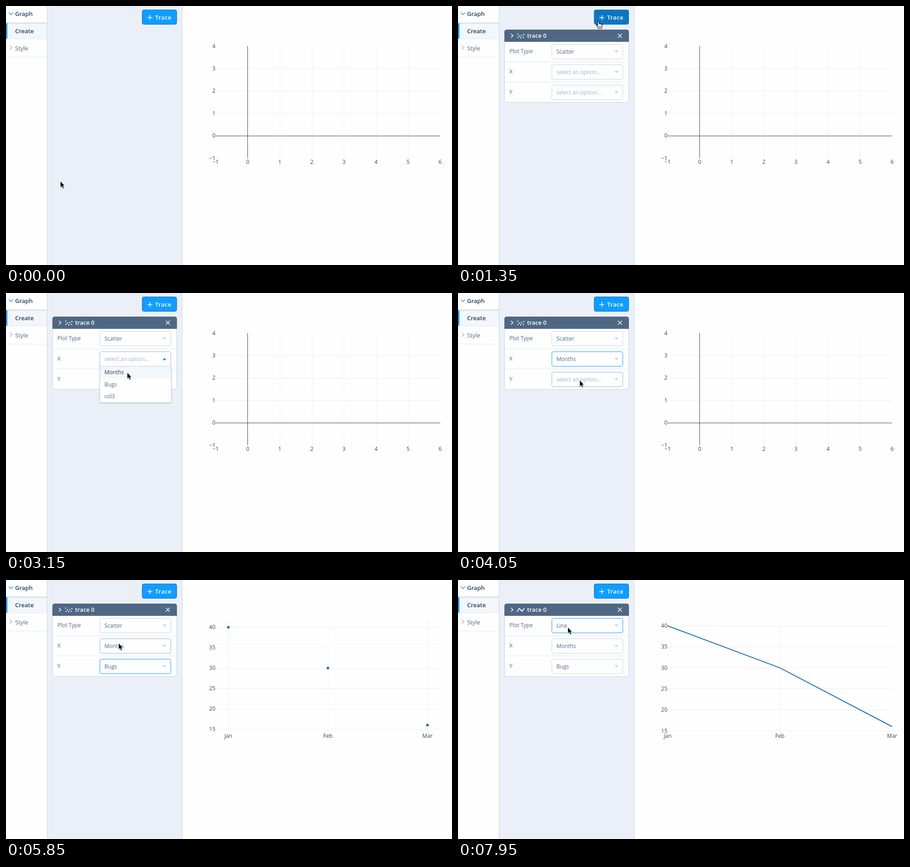
Recreate the animation shown at these times as an HTML page with a canvas. Size 981 by 571 pixels, loop 8 s.

```html
<!DOCTYPE html>
<html lang="en">
<head>
<meta charset="utf-8">
<title>Graph editor</title>
<style>
  html, body { margin: 0; width: 100%; height: 100%; overflow: hidden; background: #fefefe; }
  canvas { display: block; }
</style>
</head>
<body>
<canvas id="stage" width="981" height="571"></canvas>
<script>
const ctx = document.getElementById('stage').getContext('2d');
const LOOP = 8000, TICK = 150;
const BLUE = '#119dff', NAVY = '#0d76bf', SLATE = '#506784', INK = '#2a3f5f';
const MIST = '#c8d4e3', HAZE = '#a2b1c6', PALE = '#f3f6fa', RULE = '#dfe8f3';
const PLOT = { left: 461, right: 955, top: 88, bottom: 335 };

// Pointer moves: first tick, number of ticks, destination
const START = [120, 387];
const MOVES = [
  [300, 6, 309, 34], [1650, 6, 272, 140], [2850, 3, 267, 176], [3900, 2, 268, 193],
  [4650, 4, 262, 250], [5700, 3, 243, 102], [6450, 3, 250, 157], [7650, 3, 242, 105]
];

const SELECTS = [
  { key: 'type', label: 'Plot Type', y: 84, options: ['Scatter', 'Line', 'Area', 'Bar', 'Pie'] },
  { key: 'x', label: 'X', y: 129, options: ['Months', 'Bugs', 'col3'] },
  { key: 'y', label: 'Y', y: 174, options: ['Months', 'Bugs', 'col3'] }
];
const ROW = 26.5;

const within = (t, a, b) => t >= a && t < b;

function pointerAt(t) {
  let [x, y] = START;
  for (const [t0, steps, tx, ty] of MOVES) {
    if (t < t0) break;
    const u = Math.min(1, (Math.floor((t - t0) / TICK) + 1) / steps);
    const e = u * u * (3 - 2 * u);
    x += (tx - x) * e;
    y += (ty - y) * e;
  }
  return { x: Math.round(x), y: Math.round(y) };
}

function stateAt(t) {
  return {
    pointer: pointerAt(t),
    panel: t >= 1350,
    open: within(t, 2550, 3450) ? 'x' : within(t, 4350, 5250) ? 'y' : within(t, 6150, 7200) ? 'type' : '',
    focus: within(t, 3450, 4350) ? 'x' : within(t, 5250, 6150) ? 'y' : t >= 7200 ? 'type' : '',
    values: { type: t >= 7200 ? 'Line' : 'Scatter', x: t >= 3450 ? 'Months' : '', y: t >= 5250 ? 'Bugs' : '' },
    chart: t < 5250 ? 'empty' : t < 7200 ? 'scatter' : 'line'
  };
}

function rect(x, y, w, h, color) {
  ctx.fillStyle = color;
  ctx.fillRect(x, y, w, h);
}

function box(x, y, w, h, radius, fill, border) {
  ctx.beginPath();
  ctx.roundRect(x + .5, y + .5, w - 1, h - 1, radius);
  ctx.fillStyle = fill;
  ctx.fill();
  ctx.strokeStyle = border;
  ctx.lineWidth = 1;
  ctx.stroke();
}

function text(str, x, y, color, size = 12, weight = 400, align = 'left') {
  ctx.font = `${weight} ${size}px "Open Sans", sans-serif`;
  ctx.textAlign = align;
  ctx.fillStyle = color;
  ctx.fillText(str, x, y);
}

function trace(points) {
  ctx.beginPath();
  points.forEach(([x, y], i) => i ? ctx.lineTo(x, y) : ctx.moveTo(x, y));
}

function polyline(points, color, width) {
  trace(points);
  ctx.strokeStyle = color;
  ctx.lineWidth = width;
  ctx.stroke();
}

function polygon(points, color) {
  trace(points);
  ctx.fillStyle = color;
  ctx.fill();
}

function dot(x, y, r, color) {
  ctx.beginPath();
  ctx.arc(x, y, r, 0, 7);
  ctx.fillStyle = color;
  ctx.fill();
}

function drawSidebar() {
  rect(0, 0, 90, 571, '#fefefe');
  rect(0, 38, 90, 34, PALE);
  rect(0, 36, 90, 1, '#e6ecf4');
  rect(0, 37, 90, 1, '#d3dcea');
  rect(0, 38, 90, 1, '#e2e8f1');
  rect(0, 39, 90, 1, '#ecf0f6');
  rect(0, 38, 3, 34, BLUE);
  rect(0, 72, 90, 1, RULE);
  rect(0, 112, 90, 1, RULE);
  polyline([[6.5, 14.5], [11, 19], [15.5, 14.5]], BLUE, 1.5);
  polyline([[8.5, 87.5], [13, 92], [8.5, 96.5]], HAZE, 1.3);
  text('Graph', 20, 22, INK, 13, 600);
  text('Create', 20, 60, INK, 13, 600);
  text('Style', 20, 98, SLATE, 13);
}

function drawButton(hot) {
  box(299, 8, 77, 33, 4, hot ? NAVY : BLUE, NAVY);
  polyline([[311, 25.5], [322, 25.5]], '#fff', 1.5);
  polyline([[316.5, 20], [316.5, 31]], '#fff', 1.5);
  ctx.letterSpacing = '0.5px';
  text('Trace', 328, 30, '#fff', 13, 600);
  ctx.letterSpacing = '0px';
}

function drawTypeIcon(type) {
  if (type === 'Line') {
    polyline([[130, 70], [135, 62.5], [141, 69], [146, 62]], '#fff', 2);
    return;
  }
  const dots = [[131.5, 62], [132, 69], [135.5, 66], [138, 70], [140, 65], [143.5, 69], [145, 63]];
  for (const [x, y] of dots) dot(x, y, 1.3, '#fff');
}

function drawSelect(sel, s) {
  const open = s.open === sel.key;
  const p = s.pointer;
  const hover = !s.open && within(p.x, 206, 363) && within(p.y, sel.y, sel.y + 33);
  const border = s.focus === sel.key ? BLUE : open || hover ? HAZE : MIST;
  const value = s.values[sel.key];
  box(206, sel.y, 157, 33, open ? [3, 3, 0, 0] : 3, '#fefefe', border);
  text(value || 'select an option...', 216.5, sel.y + 21, value ? SLATE : HAZE);
  const y = sel.y + 14;
  if (open) polygon([[344, y + 5], [348.5, y], [353, y + 5]], BLUE);
  else polygon([[344, y], [353, y], [348.5, y + 5]], MIST);
}

function drawMenu(sel, s) {
  const top = sel.y + 33;
  const height = sel.options.length * ROW;
  const picked = sel.options.indexOf(s.values[sel.key]);
  const over = Math.floor((s.pointer.y - top) / ROW);
  const active = Math.max(0, over);
  ctx.save();
  ctx.shadowColor = 'rgba(42,63,95,.25)';
  ctx.shadowBlur = 3;
  ctx.shadowOffsetY = 1;
  rect(206, top, 158, height + .5, MIST);
  ctx.restore();
  rect(207, top, 156, height - .5, '#fefefe');
  rect(206, top - 1, 157, 1, MIST);
  sel.options.forEach((name, i) => {
    const y = top + i * ROW;
    if (i === active || i === picked) rect(207, y, 156, ROW, PALE);
    text(name, 216.5, Math.round(y + 17), i === active || i === picked ? INK : SLATE, 12, i === picked ? 600 : 400);
  });
}

function drawPanel(s) {
  box(102, 52, 274, 161, 5, '#fefefe', MIST);
  ctx.beginPath();
  ctx.roundRect(102, 52, 274, 27, [5, 5, 0, 0]);
  ctx.fillStyle = SLATE;
  ctx.fill();
  polyline([[116.5, 61.5], [121, 65.5], [116.5, 69.5]], '#fff', 1.5);
  drawTypeIcon(s.values.type);
  text('trace 0', 152, 70, '#fff', 13, 600);
  polyline([[351.5, 61], [360.5, 70]], '#fff', 1.2);
  polyline([[360.5, 61], [351.5, 70]], '#fff', 1.2);
  rect(103, 123, 272, 1, RULE);
  rect(103, 167, 272, 1, RULE);
  for (const sel of SELECTS) {
    text(sel.label, 113, sel.y + 20, SLATE);
    drawSelect(sel, s);
  }
  const opened = SELECTS.find(sel => sel.key === s.open);
  if (opened) drawMenu(opened, s);
}

const column = (x, color) => rect(Math.round(x), PLOT.top, 1, PLOT.bottom - PLOT.top + .5, color);
const line = (y, color) => rect(PLOT.left, Math.round(y) - .0, PLOT.right - PLOT.left, 1, color);
const tickX = (label, x) => text(label, x, 348, '#444', 12, 400, 'center');
const tickY = (label, y) => text(label, 460.5, Math.round(y + 4), '#444', 12, 400, 'right');
const signed = n => String(n).replace('-', '\u2212');

function drawEmptyChart() {
  const px = n => PLOT.left + (n + 1) * 494 / 7;
  const py = n => 285.9 - n * 49.4;
  for (let n = 1; n < 6; n++) column(px(n), '#eee');
  for (let n = 1; n < 4; n++) line(py(n) - .4, '#eee');
  column(px(0) - .1, '#444');
  line(py(0) - .4, '#444');
  for (let n = -1; n <= 6; n++) tickX(signed(n), px(n));
  for (let n = -1; n <= 4; n++) tickY(signed(n), py(n) + .3);
}

function drawDataChart(lines) {
  const gap = lines ? 247 : 219;
  const px = i => 708 + (i - 1) * gap;
  const py = lines ? v => 101 + (40 - v) * 9.26 : v => 104.3 + (40 - v) * 8.99;
  for (let i = 0; i < 3; i++) if (!lines || i === 1) column(px(i) - .5, '#eee');
  for (let v = 15; v <= 40; v += 5) {
    line(py(v) - .5, '#eee');
    tickY(v, py(v));
  }
  ['Jan', 'Feb', 'Mar'].forEach((m, i) => tickX(m, px(i)));
  const points = [40, 30, 16].map((v, i) => [px(i), py(v)]);
  if (lines) polyline(points, '#1f77b4', 2);
  else for (const [x, y] of points) dot(x, y, 3, '#1f77b4');
}

function drawArrow() {
  trace([[0, 0], [0, 12.3], [2.8, 9.8], [5, 14.6], [7, 13.7], [4.9, 9.1], [8.5, 9]]);
  ctx.closePath();
  ctx.lineJoin = 'round';
  ctx.save();
  ctx.shadowColor = 'rgba(0,0,0,.3)';
  ctx.shadowBlur = 2;
  ctx.shadowOffsetY = 1;
  ctx.strokeStyle = '#fff';
  ctx.lineWidth = 2;
  ctx.stroke();
  ctx.restore();
  ctx.fillStyle = '#000';
  ctx.fill();
  ctx.lineJoin = 'miter';
}

function drawHand() {
  ctx.beginPath();
  ctx.moveTo(-1.5, 9);
  ctx.lineTo(-2, 1.5);
  ctx.quadraticCurveTo(-.5, -1.2, 1, 1.2);
  ctx.lineTo(1.6, 5.5);
  ctx.quadraticCurveTo(3, 3.8, 4, 5.8);
  ctx.quadraticCurveTo(5.6, 4.4, 6.3, 6.5);
  ctx.quadraticCurveTo(8, 5.8, 8.2, 8);
  ctx.quadraticCurveTo(8.2, 11, 6.8, 13);
  ctx.lineTo(6.6, 15.5);
  ctx.lineTo(-.6, 15.5);
  ctx.lineTo(-1, 13.5);
  ctx.lineTo(-4.6, 8.8);
  ctx.quadraticCurveTo(-5, 6.6, -3, 7.3);
  ctx.closePath();
  ctx.fillStyle = '#fff';
  ctx.fill();
  ctx.strokeStyle = '#000';
  ctx.lineWidth = 1.1;
  ctx.stroke();
  for (const x of [1, 3, 5]) polyline([[x, 10], [x, 13]], '#000', .8);
}

function draw(t) {
  const s = stateAt(t);
  const { x, y } = s.pointer;
  const hot = within(x, 299, 376) && within(y, 8, 41);
  rect(0, 0, 981, 571, '#fefefe');
  drawSidebar();
  rect(90, 0, 298, 571, '#ebf0f8');
  rect(90, 0, 1, 571, MIST);
  rect(387, 0, 1, 571, MIST);
  drawButton(hot);
  if (s.panel) drawPanel(s);
  if (s.chart === 'empty') drawEmptyChart();
  else drawDataChart(s.chart === 'line');
  ctx.save();
  ctx.translate(x, y);
  if (hot || (s.open === 'type' && y > 117)) drawHand();
  else drawArrow();
  ctx.restore();
}

function loop() {
  draw(performance.now() % LOOP);
  requestAnimationFrame(loop);
}
loop();
</script>
</body>
</html>
```
